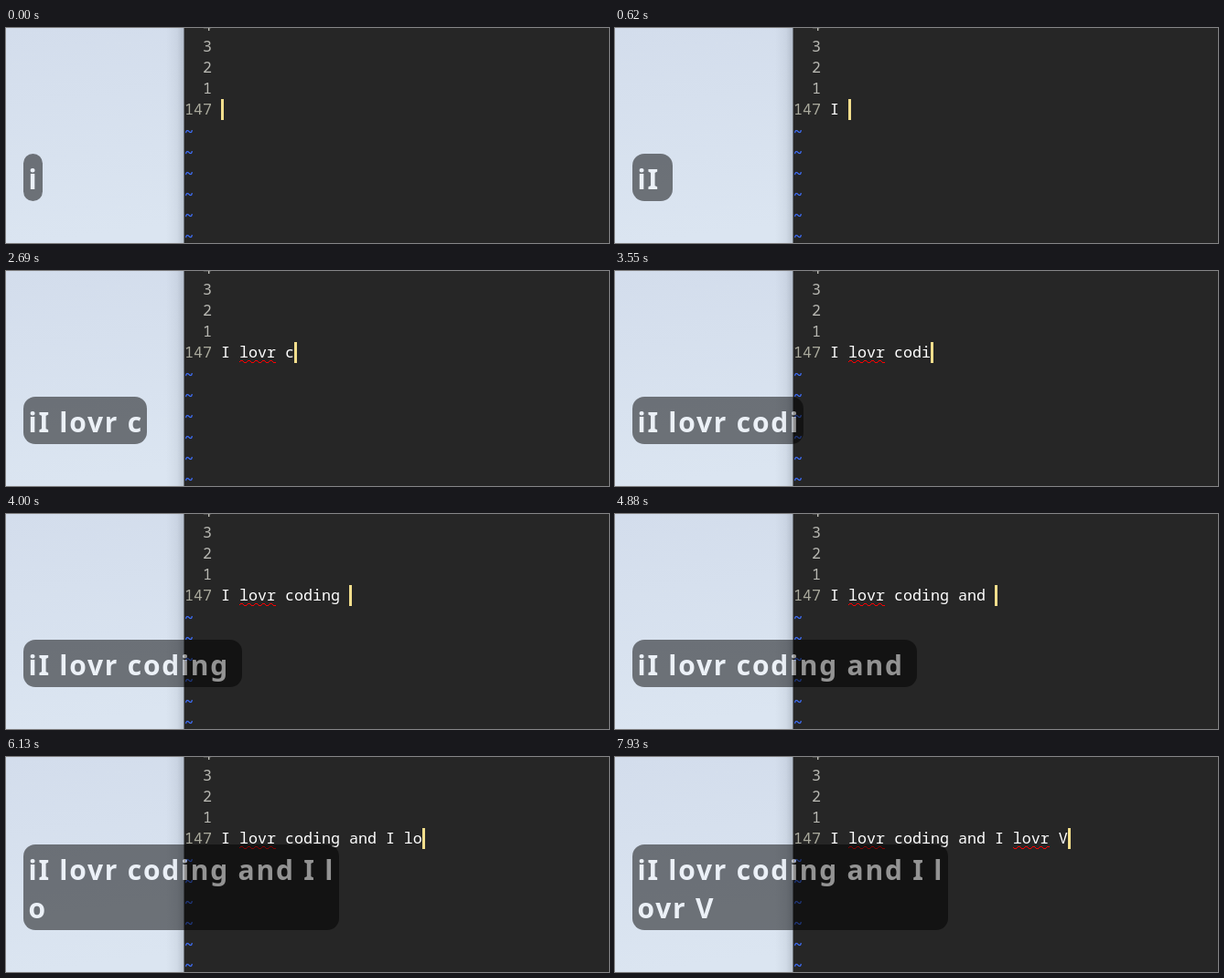
An HTML page with a canvas that plays this animation: 659x236 px, repeating every 8000 ms.

```html
<!DOCTYPE html>
<html lang="en">
<head>
<meta charset="utf-8">
<title>Typing in an editor</title>
<style>
  html, body { margin: 0; width: 100%; height: 100%; overflow: hidden; background: #262626; }
  canvas { display: block; width: 659px; height: 236px; }
</style>
</head>
<body>
<canvas></canvas>
<script>
const W = 659, H = 236, LOOP = 8000;
const EDGE = 195, TEXT_X = 235, CELL = 10, ROW = 23, BASELINE = 95;
const TEXT = 'I lovr coding and I lovr V';
const KEYS = 'i' + TEXT;

// When each character reaches the editor, and when the key overlay follows.
const typedAt = [360, 620, 1170, 1350, 1620, 1930, 2160, 2690, 2900, 3350, 3550, 3740, 3860,
  3970, 4430, 4650, 4760, 4840, 5600, 5690, 5880, 6110, 6280, 6580, 6990, 7930];
const overlayLag = { 0: 50, 3: 30, 6: 20, 9: 30, 11: 30, 12: 30, 13: 30, 14: 40, 15: 30,
  17: 40, 18: 30, 19: 30, 20: 30, 21: 20, 22: 20 };
const shownAt = typedAt.map((t, i) => t + (overlayLag[i] || 0));
const cursorOff = [[110, 360], [5540, 5600], [7770, 7930]];
const misspelled = [{ column: 2, from: 2160 }, { column: 20, from: 7090 }];

const canvas = document.querySelector('canvas');
const scale = window.devicePixelRatio || 1;
canvas.width = W * scale;
canvas.height = H * scale;
const ctx = canvas.getContext('2d');
ctx.scale(scale, scale);

const MONO = '16.667px "Noto Sans Mono", monospace';
const SANS = 'bold 30px "Noto Sans", sans-serif';

const desktop = ctx.createLinearGradient(0, 0, 30, H);
desktop.addColorStop(0, '#d3ddec');
desktop.addColorStop(1, '#dbe5f1');

const shadow = ctx.createLinearGradient(EDGE - 20, 0, EDGE, 0);
shadow.addColorStop(0, 'rgba(40,50,65,0)');
shadow.addColorStop(0.6, 'rgba(40,50,65,0.06)');
shadow.addColorStop(1, 'rgba(40,50,65,0.2)');

function fillRect(color, x, y, w, h) {
  ctx.fillStyle = color;
  ctx.fillRect(x, y, w, h);
}

function write(text, x, y, color) {
  ctx.fillStyle = color;
  ctx.fillText(text, x, y);
}

const countUntil = (times, t) => times.filter(at => at <= t).length;

function drawUndercurl(column) {
  const wave = [1, 0, 0, 0, 1, 2, 2, 2];
  const left = TEXT_X + column * CELL;
  for (let x = left; x < left + 4 * CELL; x++) {
    fillRect('#ff0000', x, 100 - wave[(x - EDGE) % 8], 1, 1);
  }
}

function drawEditor(t) {
  fillRect('#262626', EDGE, 0, W - EDGE, H);
  fillRect('#70767e', EDGE - 1, 0, 1, H);

  ctx.font = MONO;
  ctx.letterSpacing = '0px';
  for (let n = 1; n <= 4; n++) write(n, 215, BASELINE - n * ROW, '#b8b8b2');
  write('147', 195, BASELINE, '#a9a99c');
  ctx.font = 'bold ' + MONO;
  for (let n = 1; n <= 6; n++) write('~', 195, BASELINE + 2 + n * ROW, '#3f70ff');

  ctx.font = MONO;
  const typed = countUntil(typedAt, t);
  write(TEXT.slice(0, typed), TEXT_X, BASELINE, '#ffffff');
  for (const word of misspelled) if (t >= word.from) drawUndercurl(word.column);

  const hidden = cursorOff.some(([from, to]) => t >= from && t < to);
  if (!hidden) fillRect('#f2de8c', TEXT_X + typed * CELL, 78, 3, ROW);
}

function drawOverlay(t) {
  const perLine = 22, lineHeight = 42, bottom = 190, maxWidth = 345;
  const keys = KEYS.slice(0, 1 + countUntil(shownAt, t));
  const lines = [keys.slice(0, perLine)];
  if (keys.length > perLine) lines.push(keys.slice(perLine));

  ctx.font = SANS;
  ctx.letterSpacing = '1.75px';
  const width = lines.length > 1 ? maxWidth
    : Math.min(maxWidth, Math.round(ctx.measureText(keys).width + 10));
  const height = lines.length * lineHeight + 10;

  ctx.fillStyle = 'rgba(0,0,0,0.5)';
  ctx.beginPath();
  ctx.roundRect(19, bottom - height, width, height, 13);
  ctx.fill();

  // Adding mid grey to the halved backdrop equals white text at half opacity.
  ctx.globalCompositeOperation = 'lighter';
  lines.forEach((line, i) =>
    write(line, 24.5, 177 - (lines.length - 1 - i) * lineHeight, '#808080'));
  ctx.globalCompositeOperation = 'source-over';
}

function draw(now) {
  const t = now % LOOP;
  fillRect(desktop, 0, 0, EDGE, H);
  fillRect(shadow, EDGE - 20, 0, 20, H);
  drawEditor(t);
  drawOverlay(t);
}

const start = performance.now();
function frame() {
  draw(performance.now() - start);
  requestAnimationFrame(frame);
}
frame();
</script>
</body>
</html>
```
